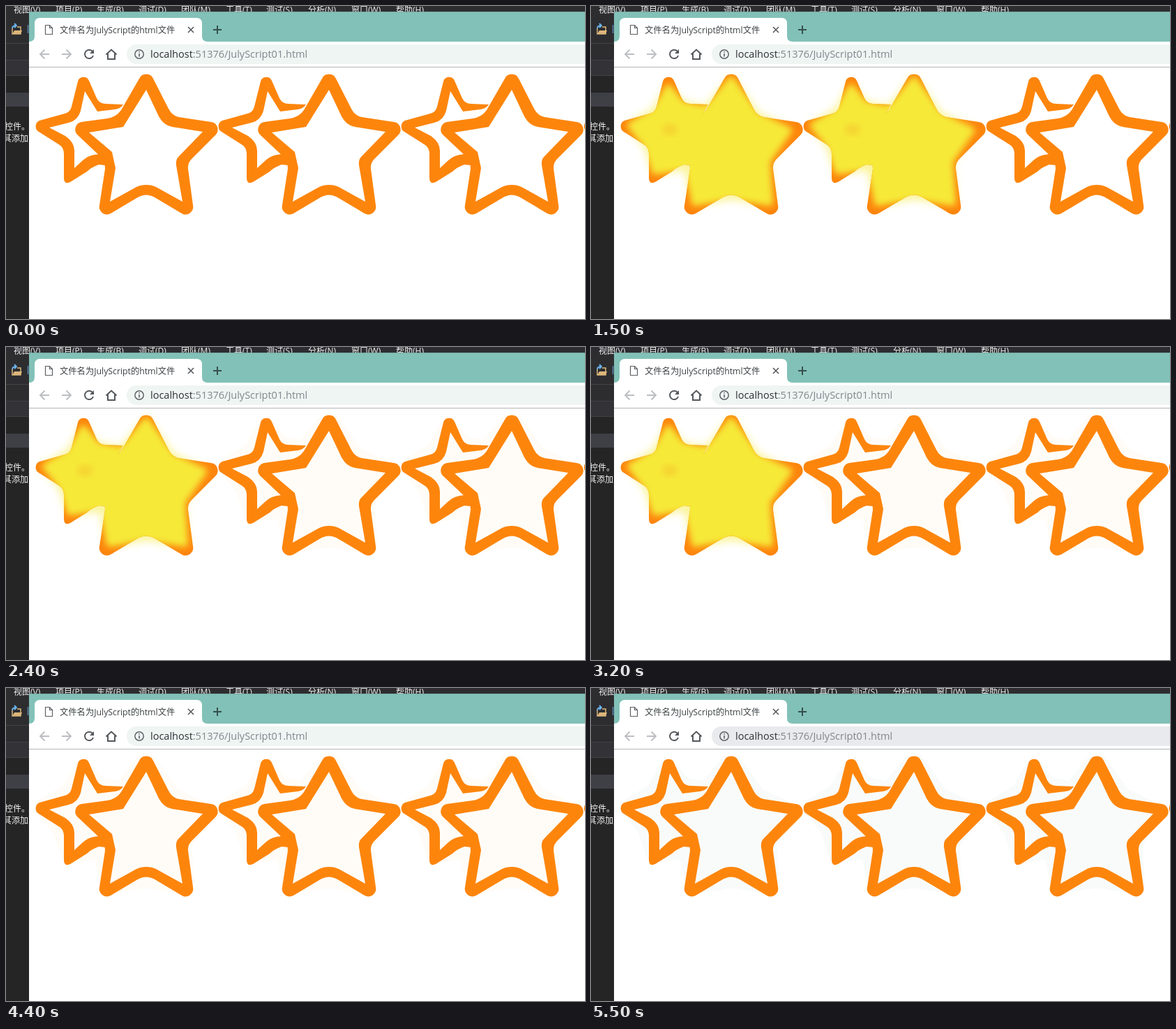
Write an HTML page that moves like this. It is 830 px wide and 448 px high and loops after 6.1 s.

```html
<!DOCTYPE html>
<html lang="zh">
<head>
<meta charset="utf-8">
<style>
  html, body { margin: 0; width: 100%; height: 100%; overflow: hidden; background: #252526; }
  svg { display: block; }
  text { font-family: "Open Sans", "Noto Sans CJK SC", "Noto Sans CJK", sans-serif; white-space: pre; }
  .ide { font-size: 12px; fill: #f1f1f1; }
</style>
</head>
<body>
<svg width="830" height="448" viewBox="0 0 830 448">
  <defs>
    <filter id="soft" x="-20%" y="-20%" width="140%" height="140%"><feGaussianBlur stdDeviation="5"/></filter>
    <filter id="halo" x="-20%" y="-20%" width="140%" height="140%"><feGaussianBlur stdDeviation="6"/></filter>
    <clipPath id="glowArea"><rect x="43" y="97" width="258" height="201"/></clipPath>
    <clipPath id="page"><rect x="33" y="88" width="797" height="360"/></clipPath>
    <clipPath id="side"><rect width="33" height="448"/></clipPath>

    <path id="bigOuter" d="M191 104A11 11 0 0 1 211 104L233 147Q238 157 248 159L294 166A11 11 0 0 1 300 185L268 217Q260 224 261 233L268 285A11 11 0 0 1 252 297L215 275Q201 266 187 275L150 297A11 11 0 0 1 134 285L142 233Q142 222 136 216L103 185A11 11 0 0 1 108 166L145 161Q158 159 165 149Z"/>
    <path id="bigInner" d="M201 120L219 158Q226 171 238 173L282 180L248 215Q243 219 244 228L253 280L215 259Q209 256 201 256Q193 256 187 259L149 280L157 232L152 209L119 181L168 173Z"/>
    <path id="smallSolid" d="M103 108A8.5 8.5 0 0 1 119 107L130 132Q134 140 143 140L168 141L160 155L143 228L133 227Q122 231 116 237L92 252Q83 256 83 246L83 212Q83 203 77 199L47 180A9 9 0 0 1 48 164L84 154Q92 152 94 144Z"/>
    <path id="smallLine" d="M103 108A8.5 8.5 0 0 1 119 107L130 132Q134 140 143 140L168 141Q164 147 156 148L131 151L113 122L107 150Q103 164 90 167L62 174L85 186Q98 195 98 207L98 232L110 221Q118 213 133 212L146 215L143 228L133 227Q122 231 116 237L92 252Q83 256 83 246L83 212Q83 203 77 199L47 180A9 9 0 0 1 48 164L84 154Q92 152 94 144Z"/>
    <path id="glow" d="M201 106L237 156L283 178L252 222L256 281L201 272L149 281L138 230L92 236L80 200L57 171L92 150L111 117L130 141L166 148Z" stroke-linejoin="round"/>
    <clipPath id="body"><use href="#smallSolid"/><use href="#bigOuter"/></clipPath>

    <g id="outline" fill="#fd850c">
      <use href="#smallLine"/>
      <path fill-rule="evenodd" id="bigLine"/>
    </g>
    <g id="solid">
      <use href="#glow" fill="#f6e937" stroke="#f6e937" stroke-width="10" opacity=".5" filter="url(#halo)"/>
      <g fill="#fd850c"><use href="#smallSolid"/><use href="#bigOuter"/></g>
      <g clip-path="url(#body)">
        <use href="#glow" fill="#f6e937" stroke="#f6e937" stroke-width="10" filter="url(#soft)"/>
      </g>
      <ellipse cx="113" cy="177" rx="11" ry="8" fill="#f5b92c" opacity=".45" filter="url(#soft)"/>
    </g>
    <use id="tint" href="#glow" stroke-width="28" clip-path="url(#glowArea)"/>
  </defs>

  <!-- editor behind the browser -->
  <rect width="830" height="448" fill="#252526"/>
  <rect width="830" height="77" fill="#2d2d30"/>
  <rect y="53" width="33" height="1" fill="#434346"/>
  <rect y="77" width="33" height="23" fill="#333337"/>
  <rect y="77" width="33" height="1" fill="#3f3f46"/>
  <rect y="99" width="33" height="1" fill="#3f3f46"/>
  <rect y="124" width="33" height="20" fill="#3f3f46"/>
  <rect id="hover" y="1" width="57" height="20" fill="#3e3e40"/>
  <g id="menu" class="ide"></g>
  <g fill="none">
    <path d="M9 32V40H21V30H16" stroke="#dcb67a" stroke-width="1.500"/>
    <path d="M9 40L12 35H23L21 40Z" fill="#dcb67a"/>
    <path d="M9 32Q9 28 15 28M12 25L15 28L12 31" stroke="#6cb5ee" stroke-width="1.800"/>
    <path d="M31.500 27V39" stroke="#5a86b0" stroke-width="1.500"/>
  </g>
  <g class="ide" clip-path="url(#side)">
    <text x="-2" y="177">控件。</text><text x="-4" y="194">其添加到</text>
  </g>

  <!-- browser window -->
  <rect x="33" y="8" width="797" height="440" fill="#fff"/>
  <rect x="33" y="8" width="797" height="43" fill="#82c1b8"/>
  <rect x="33" y="8" width="797" height="1" fill="#76aaa3"/>
  <path d="M33 51Q41 51 41 43V25Q41 17 49 17H273Q281 17 281 25V43Q281 51 289 51Z" fill="#fff"/>
  <path d="M56.500 27.500H62.500L66.500 31.500V40.500H56.500ZM62.500 27.500V31.500H66.500" fill="none" stroke="#5c5f63" stroke-width="1.200"/>
  <text x="77" y="38.500" font-size="12.300" fill="#3c4043">文件名为JulyScript的html文件</text>
  <g fill="none" stroke="#55595d" stroke-width="1.600">
    <path d="M261 30L269 38M269 30L261 38"/>
    <path d="M297 34H309M303 28V40" stroke="#36504d" stroke-width="2"/>
    <g stroke="#bcbec1" stroke-width="1.900">
      <path d="M62 69H49M55.500 62.500L49 69L55.500 75.500"/>
      <path d="M80 69H93M86.500 62.500L93 69L86.500 75.500"/>
    </g>
    <path d="M124 65A6.200 6.200 0 1 0 125 71" stroke-width="2"/>
    <path d="M126 62V68H120Z" fill="#55595d" stroke="none"/>
    <path d="M143.500 69.500L151 62.500L158.500 69.500M146 68V76H156V68" stroke-width="2"/>
  </g>
  <path id="address" d="M830 55H187A14 14 0 0 0 187 83H830Z"/>
  <circle cx="191" cy="69" r="6.200" fill="none" stroke="#5f6368" stroke-width="1.500"/>
  <path d="M191 68V72.500M191 65V66.600" stroke="#5f6368" stroke-width="1.600"/>
  <text x="207" y="74" font-size="14.500" fill="#80868b"><tspan fill="#2d3034">localhost</tspan>:51376/JulyScript01.html</text>
  <rect x="33" y="87" width="797" height="1" fill="#b4b7b6"/>
  <g id="stars" clip-path="url(#page)"></g>
</svg>
<script>
  const LOOP = 6100, SPACING = 262, SETTLE = 5500;
  const byId = id => document.getElementById(id);
  const pathOf = id => byId(id).getAttribute("d");

  function add(parent, tag, attrs) {
    const node = document.createElementNS("http://www.w3.org/2000/svg", tag);
    for (const key in attrs) node.setAttribute(key, attrs[key]);
    return parent.appendChild(node);
  }

  byId("bigLine").setAttribute("d", pathOf("bigOuter") + pathOf("bigInner"));

  const menu = [[11, "视图(V)"], [71, "项目(P)"], [130, "生成(B)"], [190, "调试(D)"], [251, "团队(M)"],
    [315, "工具(T)"], [373, "测试(S)"], [433, "分析(N)"], [495, "窗口(W)"], [559, "帮助(H)"]];
  for (const [x, label] of menu) add(byId("menu"), "text", { x, y: 10 }).textContent = label;

  const stars = [0, 1, 2, 3].map(i => {
    const group = add(byId("stars"), "g", { transform: `translate(${i * SPACING} 0)` });
    const [tint, outline, solid] = ["tint", "outline", "solid"].map(id => add(group, "use", { href: "#" + id }));
    return { tint, outline, solid };
  });

  // [time, number of lit stars]
  const ratings = [[0, 0], [1000, 1], [1500, 2], [1900, 3], [2300, 2], [2400, 1], [2900, 0], [3200, 1],
    [3600, 2], [3800, 3], [4100, 1], [4400, 0], [4900, 2], [5000, 4], [5400, 2], [5500, 0]];
  // [time, left edge of the hovered menu item]
  const hovers = [[0, -99], [500, 552], [600, 488], [700, 365], [800, -99]];

  const show = (node, on) => node.setAttribute("visibility", on ? "visible" : "hidden");

  function draw(t) {
    const past = ratings.filter(([start]) => start <= t).map(([, lit]) => lit);
    const lit = past[past.length - 1], most = Math.max(...past);
    const settled = t >= SETTLE;
    stars.forEach((star, i) => {
      show(star.solid, i < lit);
      show(star.outline, i >= lit);
      show(star.tint, i >= lit && i < most);
      for (const paint of ["fill", "stroke"]) star.tint.setAttribute(paint, settled ? "#f9fbfa" : "#fffcf7");
    });
    byId("hover").setAttribute("x", hovers.filter(([start]) => start <= t).pop()[1]);
    byId("address").setAttribute("fill", settled ? "#e8eaed" : "#eff5f3");
  }

  const begin = performance.now();
  function tick() {
    draw((performance.now() - begin) % LOOP);
    requestAnimationFrame(tick);
  }
  tick();
</script>
</body>
</html>
```
